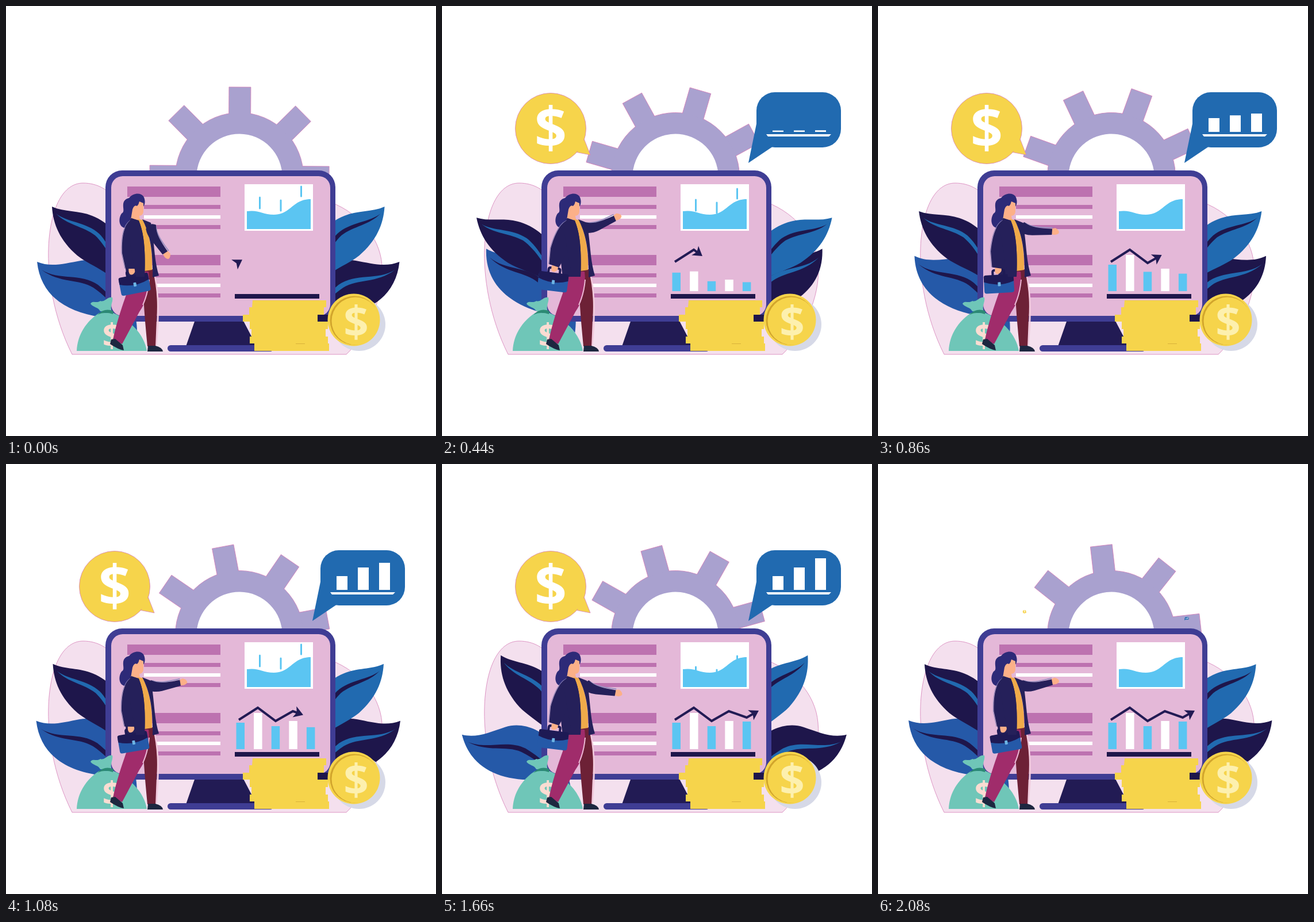
These frames come from a looping animation (748 px wide and 748 px high, 2.1 s). An HTML page:

```html
<!DOCTYPE html>
<html lang="en">
<head>
<meta charset="utf-8">
<title>Business growth</title>
<style>
  html, body { margin: 0; width: 100%; height: 100%; overflow: hidden; background: #fff; }
  svg { display: block; width: 100vw; height: 100vh; }
  text { font: 700 48px "Open Sans", "Noto Sans", sans-serif; text-anchor: middle; }
  .navy { fill: #1e164b; }
  .blue { fill: #216ab0; }
  .royal { fill: #2559a8; }
  .frame { fill: #3f3d94; }
  .jacket { fill: #25205a; }
  .skin { fill: #fcb088; }
  .sky { fill: #5bc5f2; }
  .white { fill: #fff; }
  .yellow { fill: #f6d44b; }
  .teal { fill: #6fc6b8; }
  .mauve { fill: #bd72b0; }
  .edge { stroke: #d67fb8; stroke-width: .8; }
</style>
</head>
<body>
<svg viewBox="0 0 748 748">
  <defs>
    <path id="upLeaf" d="M80 349C102 359 126 355 150 365C178 376 204 402 211 440C215 465 216 490 215 510C192 464 152 456 124 434C94 408 82 380 80 349Z"/>
    <path id="upVein" d="M87 361C105 376 140 376 162 396C180 414 194 450 202 484C188 448 176 419 155 399C134 383 106 381 87 361Z"/>
    <path id="lowLeaf" d="M54 445C78 455 102 448 130 443C160 438 190 455 205 480C222 515 228 545 228 567C212 549 190 544 165 541C102 532 60 502 54 445Z"/>
    <path id="lowVein" d="M62 459C92 478 130 464 160 485C188 508 206 534 217 552C196 532 176 506 152 490C126 474 94 483 62 459Z"/>
  </defs>

  <path fill="#f4e0ee" class="edge" d="M115 606C82 540 72 470 74 420C77 350 100 308 134 308C160 308 178 320 195 340L555 338C610 355 650 400 654 450C660 505 625 575 592 606Z"/>

  <g id="gear" fill="#a9a1cf">
    <circle r="111.5" class="edge"/>
    <g id="teeth" class="edge"></g>
    <circle r="111"/>
    <circle r="74.5" class="white"/>
  </g>

  <g>
    <g class="lowLeaf"><use href="#lowLeaf" class="royal"/><use href="#lowVein" class="navy"/></g>
    <g class="upLeaf"><use href="#upLeaf" class="navy"/><use href="#upVein" class="blue"/></g>
  </g>
  <g transform="translate(738.5) scale(-1 1)">
    <g class="lowLeaf"><use href="#lowLeaf" class="navy"/><use href="#lowVein" class="blue"/></g>
    <g class="upLeaf"><use href="#upLeaf" class="blue"/><use href="#upVein" class="navy"/></g>
  </g>

  <!-- monitor -->
  <path fill="#221b54" d="M329 546H412L436 592H313Z"/>
  <rect class="frame" x="281" y="590" width="184" height="11" rx="5.5"/>
  <rect class="frame" x="173" y="286" width="400" height="263" rx="29"/>
  <rect fill="#e4b8d8" x="183" y="296" width="381" height="243" rx="20"/>
  <g class="mauve">
    <path d="M211 314H373V332H211ZM240 346H373V353H240ZM240 381H373V388H240Z"/>
    <path d="M240 433H373V451H240ZM240 465H373V472H240ZM240 500H373V507H240Z"/>
    <path class="white" d="M240 364H373V370H240ZM240 483H373V489H240Z"/>
  </g>
  <rect class="white" x="415" y="310" width="119" height="81"/>
  <path id="sticks" fill="none" stroke="#5bc5f2" stroke-width="3" stroke-linecap="round" d="M441.500 333V352M478 338V356M513.500 314V331"/>
  <path class="sky" d="M419 357C440 354 446 363 466 363C496 363 498 336 530 336V388H419Z"/>
  <path class="navy" d="M398 501H545V509H398Z"/>
  <g id="bars"></g>
  <path id="trend" fill="none" stroke="#221b54" stroke-width="4" d="M405 445L438 424L469 447L499 430L530 441L551 429"/>
  <path id="head" fill="#221b54" d="M0 0L-16 -10L-12 0L-16 10Z"/>

  <!-- coins -->
  <path class="navy" d="M541 537H560V549H541Z"/>
  <path class="yellow" d="M429 512H557V524H553V537H542V549H560V562H556V575H560V587H562V600H432V587H424V575H427V562H424V549H412V537H423V524H428Z"/>
  <path stroke="#d9b23a" d="M504 587.500H520"/>
  <circle fill="#d6d9e7" cx="614" cy="554" r="46"/>
  <circle class="yellow" cx="605" cy="546" r="45.500"/>
  <circle fill="#d2a52c" cx="606" cy="547" r="42.500"/>
  <circle class="yellow" cx="608" cy="548" r="41.500"/>
  <text x="609" y="576" fill="#fdf0ae" style="font-size:76px">$</text>

  <!-- money bag -->
  <path class="teal" d="M123 600C124 572 140 548 162 534H187C215 546 240 570 245 600Z"/>
  <path class="teal" d="M164 531C160 523 152 525 147 518C150 511 158 518 164 513C172 516 176 505 185 507C187 515 180 521 184 531Z"/>
  <path fill="#2c8a74" d="M159 537Q172 524 187 531L186 536Q172 531 159 537Z"/>
  <text x="184" y="594" fill="#fbdcd2" style="font-size:57px">$</text>

  <!-- woman -->
  <path fill="none" stroke="#f2cadd" stroke-width="3" d="M258 468C266 500 266 540 261 590"/>
  <path fill="#6d2136" d="M236 460L255 458C263 490 264 520 262 545L260 593L246 592C243 560 240 530 239 500Z"/>
  <path fill="#a02c6b" d="M215 462H248C251 488 246 512 232 532L202 588L186 581C191 555 202 522 210 500Z"/>
  <path fill="none" stroke="#eab9d3" stroke-width="2" d="M249 476Q247 500 238 520"/>
  <path fill="#1d2740" d="M183 580L190 579L203 590L205 599Q196 598 181 588ZM247 591H260Q272 594 273 601H246Z"/>
  <path fill="#2d2a78" d="M214 334C222 324 235 325 239 331C243 338 242 345 239 349L222 357C224 372 215 386 206 386C195 383 196 368 201 361C207 358 203 352 204 344C205 338 209 335 214 334Z"/>
  <path class="skin" d="M239 343V358Q238 365 232 365L234 376L217 372L220 354Q223 345 228 348Q231 345 232 340Z"/>
  <path fill="#f0aa4a" d="M229 371L238 372C248 392 255 420 254 459L241 461Z"/>
  <path class="jacket" d="M218 369L231 373C240 395 243 425 241 471H210C205 440 205 405 209 382ZM237 371L252 377L255 396C258 420 259 448 266 469L255 472C256 425 250 395 237 371Z"/>
  <g id="bagArm">
    <g transform="rotate(-11 224 485)">
      <path fill="none" stroke="#1e1a55" stroke-width="4" d="M214 470V463Q214 460 218 460H230Q234 460 234 463V470"/>
      <rect class="royal" x="198" y="470" width="52" height="30" rx="4"/>
      <path fill="#1e1a55" d="M202 468H247Q250 468 250 471V480Q224 490 198 480V471Q198 468 202 468Z"/>
      <rect x="222" y="481" width="5" height="7" rx="1" fill="#6cb4e4"/>
    </g>
    <path class="skin" d="M214 453H224L225 461Q222 469 216 467Q212 463 214 453Z"/>
    <path fill="none" stroke="#8f86b8" d="M216 373C203 382 200 405 201 430L207 457"/>
    <path class="jacket" d="M217 372C204 382 201 405 202 430L208 457H226C231 430 235 400 230 382Z"/>
  </g>
  <path class="jacket" d="M218 369L231 374C240 395 243 425 241 471H226L212 390Z"/>
  <g id="pointArm">
    <path fill="none" stroke="#9a90c0" stroke-width="2" d="M254 377C266 381 280 378 302 372"/>
    <path class="skin" d="M301 374L307 371Q315 373 315 378Q312 384 302 383Z"/>
    <path class="jacket" d="M252 376C266 382 280 379 302 374L304 384L272 394Q262 397 252 395Q243 385 252 376Z"/>
  </g>

  <!-- speech bubbles -->
  <g id="coinBubble">
    <path class="yellow edge" d="M245 226L258 259L222 252Z"/>
    <circle class="yellow edge" cx="189" cy="213" r="61.500"/>
    <path class="yellow" d="M243 225L255 255L222 250Z"/>
    <text class="white" x="189" y="247" style="font-size:98px">$</text>
  </g>
  <g id="chartBubble">
    <rect class="blue" x="547" y="150" width="147" height="96" rx="32"/>
    <path class="blue" d="M547 205L533 273L582 240Z"/>
    <path class="white" d="M564 223H677L673 227H567Z"/>
    <g id="miniBars"></g>
  </g>
</svg>
<script>
const LOOP = 2100;
const byId = id => document.getElementById(id);
const clamp = v => Math.max(0, Math.min(1, v));
const place = (el, value) => el.setAttribute('transform', value);

// Swings 0, 1, 0, -1, 0 over one loop
const swing = p => 1 - Math.abs((p + .25) % 1 * 4 - 2);

function track(t, keys) {
  const i = Math.max(1, keys.findIndex(k => k[0] >= t));
  const [t0, v0] = keys[i - 1], [t1, v1] = keys[i];
  return v0 + (v1 - v0) * (t - t0) / (t1 - t0);
}

function addRect(parent, attrs) {
  const el = document.createElementNS('http://www.w3.org/2000/svg', 'rect');
  for (const name in attrs) el.setAttribute(name, attrs[name]);
  return byId(parent).appendChild(el);
}

for (let a = 0; a < 360; a += 45)
  addRect('teeth', { x: -19, y: -156, width: 38, height: 60, transform: `rotate(${a})` });

// Each bar: full height, start and end of growth
const makeBars = (parent, x, step, width, base, list) =>
  list.map(([height, start, end, fill], i) => ({
    el: addRect(parent, { x: x + i * step, width, fill }), base, height, start, end
  }));

const bars = [
  ...makeBars('bars', 400.5, 30.6, 14.5, 496, [
    [46, 0, 630, '#5bc5f2'], [63, 0, 810, '#fff'], [40, 0, 1025, '#5bc5f2'],
    [49, 0, 1080, '#fff'], [48, 0, 1360, '#5bc5f2']
  ]),
  ...makeBars('miniBars', 575, 37, 19, 219, [
    [24, 400, 810, '#fff'], [39, 400, 1025, '#fff'], [55, 400, 1195, '#fff']
  ])
];

const armKeys = [[0, 69], [350, -24], [700, 25], [1050, 5], [1400, -29], [1700, 30], [2100, -1]];
const stickKeys = [[0, 0], [400, 0], [600, 20], [650, 20], [900, 30], [1050, 30]];
const trend = byId('trend'), trendLength = trend.getTotalLength();
const leaves = [['.upLeaf', -9, '215 510'], ['.lowLeaf', 10, '220 590']];

function draw(t) {
  const s = swing(t / LOOP);
  place(byId('gear'), `translate(406 297) rotate(${180 * s})`);
  for (const [name, angle, pivot] of leaves)
    document.querySelectorAll(name).forEach(el => place(el, `rotate(${angle * s} ${pivot})`));

  place(byId('bagArm'), `rotate(${21.5 * Math.abs(s)} 222 385)`);
  place(byId('pointArm'), `rotate(${track(t, armKeys)} 253 385)`);
  place(byId('sticks'), `translate(0 ${track(t % 1050, stickKeys)})`);

  for (const b of bars) {
    const h = b.height * clamp((t - b.start) / (b.end - b.start));
    b.el.setAttribute('y', b.base - h);
    b.el.setAttribute('height', h);
  }

  const size = Math.min(clamp(t / 400), clamp((LOOP - t) / 400));
  place(byId('coinBubble'), `translate(258 259) scale(${size}) translate(-258 -259)`);
  place(byId('chartBubble'), `translate(533 272) scale(${size}) translate(-533 -272)`);

  const length = Math.min(trendLength, 7 + .115 * t);
  const tip = trend.getPointAtLength(length), back = trend.getPointAtLength(length - 2);
  const angle = Math.atan2(tip.y - back.y, tip.x - back.x) * 180 / Math.PI;
  trend.setAttribute('stroke-dasharray', `${Math.max(0, length - 8)} 999`);
  place(byId('head'), `translate(${tip.x} ${tip.y}) rotate(${angle})`);
}

const begin = performance.now();
function tick() {
  draw((performance.now() - begin) % LOOP);
  requestAnimationFrame(tick);
}
tick();
</script>
</body>
</html>
```
